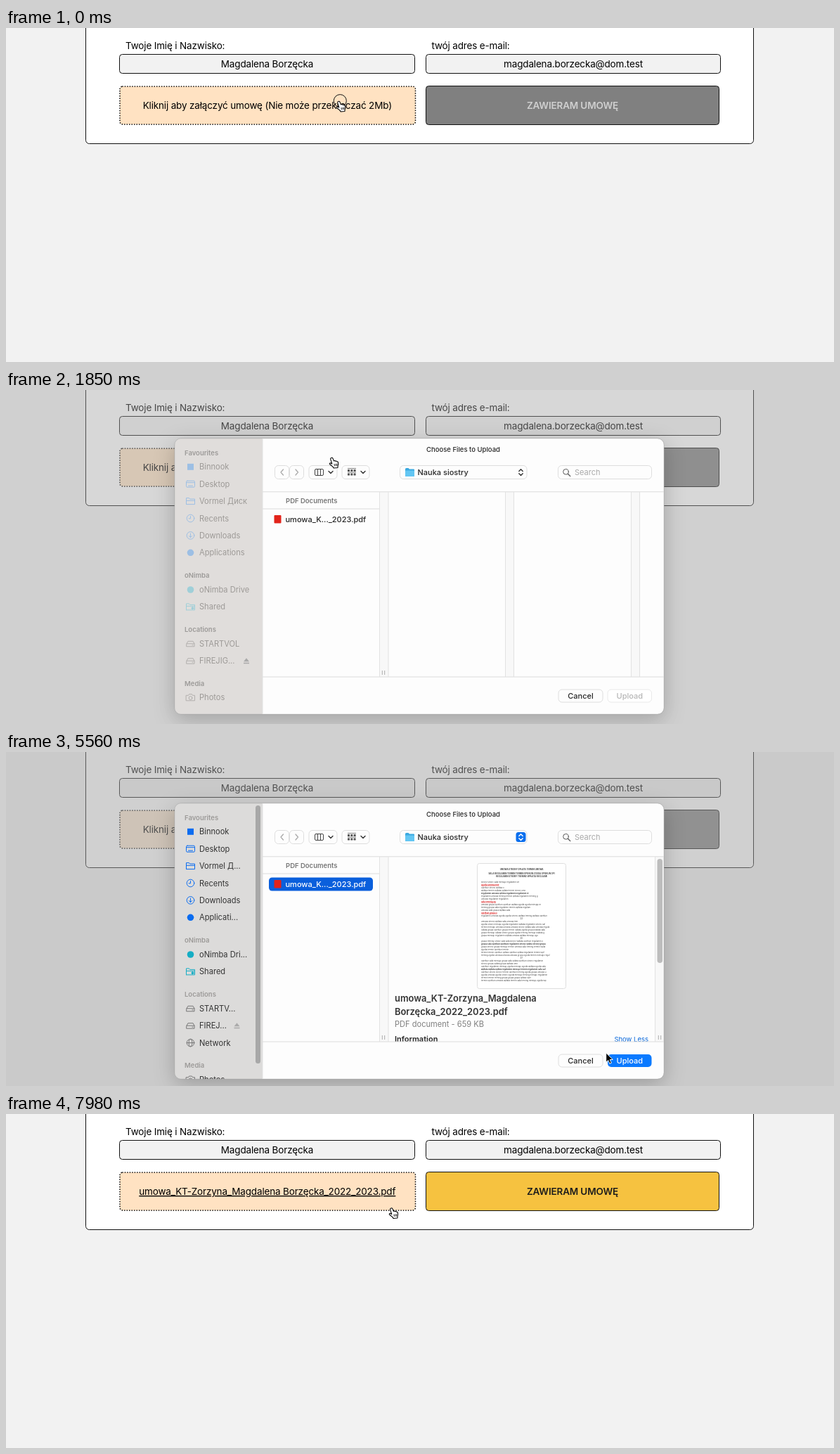
An HTML page for the animation above (8 s loop, 1178 px wide and 475 px high).

```html
<!DOCTYPE html>
<html lang="pl">
<head>
<meta charset="utf-8">
<title>Umowa</title>
<style>
  html, body { margin: 0; width: 100%; height: 100%; overflow: hidden; background: #f2f2f2; }
  svg { position: fixed; left: 0; top: 0; display: block; }
  text { font-family: Inter, "Open Sans", sans-serif; white-space: pre; }
  .page { font-size: 13.5px; letter-spacing: -.012em; }
  .ui { font-size: 11px; fill: #262626; }
  .small { font-size: 9.5px; }
  .icon { fill: none; stroke-width: 1; stroke-linejoin: round; stroke-linecap: round; }
  .shadow { filter: drop-shadow(0 8px 15px rgba(0,0,0,.22)); }
  .control { fill: none; stroke: #d6d6d6; stroke-width: .8; }
  .tiny { font-size: 2.9px; fill: #444; }
</style>
</head>
<body>
<svg id="stage" width="1178" height="475" viewBox="0 0 1178 475"></svg>
<script>
const LOOP = 8000;
const FILE = ["umowa_KT-Zorzyna_Magdalena", "Borzęcka_2022_2023.pdf"];

// Markup helpers
const rect = (x, y, w, h, r, attrs) =>
  `<rect x="${x}" y="${y}" width="${w}" height="${h}" rx="${r}" ${attrs}/>`;
const path = (d, attrs = "") => `<path d="${d}" ${attrs}/>`;
const text = (x, y, s, attrs = 'class="ui"') => `<text x="${x}" y="${y}" ${attrs}>${s}</text>`;
const group = (id, body, attrs = "") => `<g id="${id}" ${attrs}>${body}</g>`;
const vline = (x, y1, y2) => path(`M${x} ${y1}V${y2}`, 'stroke="#e2e2e2"');
const hline = (y, x1, x2) => path(`M${x1} ${y}H${x2}`, 'stroke="#dcdcdc"');
const MID = 'text-anchor="middle"';
const BOX = 'stroke="#111" stroke-width="1"';

function page() {
  const label = (x, y, s, more = "") => text(x, y, s, `class="page" ${more}`);
  const bold = 'text-anchor="middle" font-weight="600"';
  return rect(113.5, -8.5, 950, 173, 5, `fill="#fff" ${BOX}`)
    + label(170, 29.5, "Twoje Imię i Nazwisko:")
    + label(605.5, 29.5, "twój adres e-mail:")
    + rect(161.5, 37.5, 420, 27, 4, `fill="#f2f2f2" ${BOX}`)
    + rect(597.5, 37.5, 419, 27, 4, `fill="#f2f2f2" ${BOX}`)
    + label(371.5, 55.7, "Magdalena Borzęcka", MID)
    + label(807, 55.7, "magdalena.borzecka@dom.test", MID)
    + rect(162, 83, 420.5, 54, 4,
        'id="drop" stroke="#111" stroke-width="1.75" stroke-linecap="round" stroke-dasharray="0 3.48"')
    + group("prompt", label(371.8, 115, "Kliknij aby załączyć umowę (Nie może przekraczać 2Mb)", MID))
    + group("attached", label(371.8, 115, FILE.join(" "), MID + ' text-decoration="underline"'))
    + rect(597.5, 82.5, 417, 55, 4, `id="submit" ${BOX}`)
    + label(806, 115, "ZAWIERAM UMOWĘ", bold + ' id="submitText"');
}

// Sidebar icons, centred on 0,0
const ICONS = {
  square: rect(-4.5, -4.5, 9, 9, 0, 'fill="currentColor" stroke="none"'),
  dot: '<circle r="4.8" fill="currentColor" stroke="none"/>',
  desktop: rect(-6, -4.5, 12, 9, 1.5, "") + path("M-6 -2H6M-3 2.5H3"),
  folder: path("M-6 4V-4.5H-2L-.8 -3H6V4.5H-6ZM-6 -.8H6"),
  clock: '<circle r="5.3"/>' + path("M0 -3V.3H-2.4"),
  down: '<circle r="5.3"/>' + path("M0 -2.8V2.6M-2.2 .6L0 2.8L2.2 .6"),
  shared: path("M-6 4V-4.5H-2L-.8 -3H6V4.5H-6ZM-6 -1H6") + '<circle cx="3" cy="1.8" r="1.5" fill="currentColor"/>',
  drive: path("M-5.5 0L-3.6 -3.5H3.6L5.5 0V4H-5.5ZM-5.5 0H5.5M2.5 2H3.5"),
  globe: '<circle r="5.3"/><ellipse rx="2.4" ry="5.3"/>' + path("M-5.3 0H5.3"),
  camera: path("M-6 -3H-3L-2 -4.7H2L3 -3H6V4.5H-6Z") + '<circle cy=".7" r="2.4"/>'
};

// Rows: label, shortened label, icon, colour variable
const SECTIONS = [
  ["Favourites", 93, [
    ["Binnook", 0, "square", "blue"], ["Desktop", 0, "desktop", "blue"],
    ["Vormel Диск", "Vormel Д...", "folder", "blue"], ["Recents", 0, "clock", "blue"],
    ["Downloads", 0, "down", "blue"], ["Applications", "Applicati...", "dot", "blue"]]],
  ["oNimba", 267.7, [["oNimba Drive", "oNimba Dri...", "dot", "teal"], ["Shared", 0, "shared", "teal"]]],
  ["Locations", 344.5, [["STARTVOL", "STARTV...", "drive", "gray"], ["FIREJIG...", "FIREJ...", "drive", "gray"]]],
  ["Media", 421, [["Photos", 0, "camera", "gray"]]]
];

function sidebar(narrow) {
  let out = "";
  for (const [title, top, rows] of SECTIONS) {
    const list = narrow && title === "Locations" ? [...rows, ["Network", 0, "globe", "gray"]] : rows;
    const y0 = top + (narrow && title === "Media" ? 24.4 : 0);
    out += text(254, y0 + 3.5, title, 'class="small" font-weight="600" fill="#9c9a98"');
    list.forEach(([full, short, icon, tone], i) => {
      const y = y0 + 20.3 + i * 24.4;
      out += `<g class="icon" transform="translate(262.5 ${y})" style="color:var(--${tone});stroke:var(--${tone})">${ICONS[icon]}</g>`
        + text(275, y + 4, narrow && short || full, 'font-size="11.1" fill="var(--label)"');
      if (full.startsWith("FIRE")) {
        const x = narrow ? 328.5 : 342;
        out += path(`M${x - 4} ${y + 1}L${x} ${y - 4}L${x + 4} ${y + 1}ZM${x - 4} ${y + 2.6}h8v1.4h-8Z`, 'fill="#aaa"');
      }
    });
  }
  if (narrow) out += rect(355, 76, 7, 367, 3.5, 'fill="#a8a8a8"');
  return out;
}

function toolbar() {
  const chev = (x, y) => path(`M${x - 3} ${y - 1.5}l3 3l3 -3`, 'class="icon" stroke="#333" style="stroke-width:1.4"');
  const button = (x, w) => rect(x, 111.5, w, 19, 5, 'class="control"');
  let grid = "";
  for (const y of [117, 122.5]) for (const x of [486, 490.3, 494.6]) grid += rect(x, y, 3, 3, .5, 'fill="#555"');
  return text(650.5, 91.5, "Choose Files to Upload", 'class="ui small" font-weight="500" ' + MID)
    + button(382.5, 20) + button(403.5, 20) + button(431, 40) + button(478, 39)
    + path("M394.5 117l-3.5 4l3.5 4M412 117l3.5 4l-3.5 4", 'class="icon" stroke="#aaa" style="stroke-width:1.3"')
    + rect(439.5, 116.5, 12, 9, 1.5, 'class="icon" stroke="#444"')
    + path("M443.5 116.5v9M447.5 116.5v9", 'class="icon" stroke="#444"')
    + chev(462, 121) + grid + path("M486 115.5h12M486 121.2h12", 'stroke="#666" stroke-width=".8"') + chev(508, 121)
    + button(560.5, 180.5)
    + path("M568 116.5q0 -1.5 1.5 -1.5h3l1.5 1.5h6q1 0 1 1v8q0 1.5 -1.5 1.5h-10q-1.5 0 -1.5 -1.5Z", 'fill="#3aa9e0"')
    + rect(568, 118.5, 13, 8.5, 1, 'fill="#63c6f3"')
    + text(585.5, 125, "Nauka siostry", 'class="ui" font-weight="500"')
    + group("stepperOn", rect(725.5, 114, 14, 14, 3.5, 'fill="#0a6fee"'))
    + path("M729.8 119.5l2.7 -2.7l2.7 2.7M729.8 122.7l2.7 2.7l2.7 -2.7", 'id="stepper" class="icon" style="stroke-width:1.4"')
    + button(785.5, 133)
    + '<circle cx="796.5" cy="120.3" r="3.8" class="icon" stroke="#555"/>'
    + path("M799.4 123.2l3.4 3.4", 'class="icon" stroke="#555" style="stroke-width:1.3"')
    + text(809, 125, "Search", 'font-size="11" fill="#a9a9a9"');
}

function seeded(seed) {
  return () => (seed = (seed * 16807) % 2147483647) / 2147483647;
}

function documentPreview() {
  const words = "umowa strony opłata termin miesiąc grupa zgoda regulamin wpłata trening sala opiekun".split(" ");
  const rnd = seeded(77);
  const line = n => {
    let s = "";
    while (s.length < n) s += words[Math.floor(rnd() * words.length)] + " ";
    return s.slice(0, n);
  };
  let out = rect(670.5, 158.5, 126, 178, 3, 'fill="#fff" stroke="#dedede"');
  [[168, 32], [173.5, 54], [178.3, 40]].forEach(([y, n]) =>
    out += text(733.5, y, line(n).toUpperCase(), `class="tiny" font-weight="700" ${MID}`));
  for (let i = 0; i < 36; i++) {
    const y = 185.5 + i * 4;
    const red = i === 1 || i === 7 || i === 11;
    if (i === 13 || i === 20 || i === 27) {
      out += text(733.5, y, "§" + i % 10, `class="tiny" ${MID}`);
      continue;
    }
    const n = red ? 15 : i % 5 === 4 || i < 12 ? 22 + Math.floor(rnd() * 36) : 64;
    const look = red ? 'style="fill:#d22" text-decoration="underline"' : "";
    out += text(676, y, line(n), `class="tiny" font-weight="${red || i % 9 === 4 ? 700 : 400}" ${look}`);
  }
  return out;
}

function browser() {
  const grip = (x, y) => path(`M${x - 1.7} ${y - 3}v6M${x + 1.7} ${y - 3}v6`, 'stroke="#aaa"');
  const strip = (x, w) => rect(x, 149, w, 263, 0, 'fill="#000" fill-opacity=".02"')
    + vline(x, 149, 412) + vline(x + w, 149, 412);
  const empty = strip(710.5, 12) + strip(889.5, 12);
  const info = strip(923.5, 12.5) + rect(926.5, 152, 7.5, 148, 3.75, 'fill="#bdbdbd"') + grip(930, 406)
    + group("thumb", documentPreview())
    + FILE.map((s, i) => text(553, 355 + i * 19, s, 'font-size="12.9" font-weight="600" fill="#333"')).join("")
    + text(553, 391.3, "PDF document - 659 KB", 'font-size="11.1" fill="#808080"')
    + `<g clip-path="url(#cols)">${text(553, 412.3, "Information", 'class="ui" font-weight="600"')}</g>`
    + text(914, 412, "Show Less", 'class="small" fill="#0a68da" text-anchor="end"');
  return hline(148.8, 365, 936)
    + text(398, 164.8, "PDF Documents", 'class="small" font-weight="600" fill="#777"')
    + hline(173, 365, 531) + strip(531.5, 12.5) + grip(537, 406)
    + group("empty", empty) + group("info", info)
    + group("picked", rect(374, 178.5, 148, 19, 4.5, 'fill="#0a5fdc"'))
    + rect(381.5, 182, 10, 11.5, 1, 'fill="#e2231a"')
    + text(397.5, 192, "umowa_K..._2023.pdf", 'id="fileName" font-size="11" font-weight="500"')
    + hline(412, 365, 936)
    + rect(786, 430, 63, 18, 5, 'class="control"')
    + text(817.5, 443, "Cancel", 'class="ui" font-weight="500" ' + MID)
    + rect(856, 430, 62.5, 18, 5, 'id="upload" stroke-width=".8"')
    + text(887.3, 443, "Upload", `id="uploadText" font-size="11" font-weight="500" ${MID}`);
}

const ARROW = path("M0 0V13.2L3 10.4L5.2 15.3L7.6 14.2L5.5 9.5H9.6Z",
  'fill="#000" stroke="#fff" stroke-width="1" stroke-linejoin="round"');
const HAND = path("M3.2 1C4.5 .4 5.3 1.2 5.7 2.4L6.8 5.4C7.6 4.8 8.7 5 9 5.8C9.8 5.2 10.9 5.5 11.1 6.3"
  + "C12 6 12.8 6.6 12.9 7.5C13.3 9.5 13 11 12.5 12.5L12.4 15L6.5 15.5L6 14.2C4.5 13 3 11.5 1.2 10.2"
  + "C.2 9.3 1.2 8 2.5 8.5L4.2 9.4L2.2 3.2C1.9 2.2 2.3 1.3 3.2 1Z",
  'fill="#fff" stroke="#000" stroke-width="1.1" stroke-linejoin="round"')
  + path("M7.4 9.6l.4 3.2M9.3 9.4l.3 3.2M11 9.2l.2 3.2", 'stroke="#000" stroke-width=".8"');

const stage = document.getElementById("stage");
stage.innerHTML = `<defs>
    <clipPath id="frame">${rect(240, 73, 696, 392, 9, "")}</clipPath>
    <clipPath id="cols">${rect(365, 149, 571, 263, 0, "")}</clipPath>
  </defs>`
  + page()
  + rect(0, 0, 1178, 475, 0, 'id="dim" fill="#a2a2a2"')
  + group("dialog",
      group("panel", rect(240, 73, 696, 392, 9, 'class="shadow" fill="#fdfdfd"')
        + `<g clip-path="url(#frame)">${rect(240, 73, 125, 392, 0, 'id="sideFill"')}</g>`
        + rect(239.8, 72.8, 696.4, 392.4, 9.2, 'fill="none" stroke="#a5a5a5" stroke-width=".6"'))
      + group("content", vline(365, 73, 465) + group("wide", sidebar(false)) + group("narrow", sidebar(true))
        + toolbar() + browser(), 'clip-path="url(#frame)"'))
  + group("pointer", '<circle id="ring" cx="1.7" cy="-.4" r="9" fill="none" stroke="#111"/>'
      + group("arrow", ARROW) + group("hand", HAND, 'transform="translate(-4 -.5)"'));

const el = Object.fromEntries([...stage.querySelectorAll("[id]")].map(n => [n.id, n]));
const show = (id, on) => el[id].style.display = on ? "" : "none";
const set = (id, name, value) => el[id].setAttribute(name, value);

// time, dialog shift, panel opacity, content opacity, dimming
const DIALOG = [
  [0, 0, 0, 0, 0],
  [1730, -26, .3, .35, .12], [1790, -12, .85, .85, .3], [1850, -4, 1, 1, .43],
  [1910, -1.5, 1, 1, .48], [1960, -.5, 1, 1, .5], [2020, 0, 1, 1, .5],
  [6750, 0, 1, 1, .5], [6810, -1, .96, 1, .5], [6870, -7, .75, .85, .35],
  [6920, -15, .4, .6, .19], [6980, -26, .08, .22, .06], [7040, -30, .03, .1, .02],
  [7100, 0, 0, 0, 0]
];
// time and pointer tip
const TRACK = [
  [0, 473.6, 104], [60, 473.6, 104], [350, 463.6, 96], [2450, 463.6, 96],
  [2750, 468, 119], [3000, 451, 164], [3250, 435.5, 187], [3310, 435.5, 186.3], [4700, 435.5, 186.3],
  [4880, 470, 206], [5130, 640, 301], [5380, 812, 403], [5510, 851, 426],
  [5800, 866.4, 437.3], [7510, 866.4, 437.3], [7690, 812, 382], [7860, 614, 198], [7980, 548.5, 133.5]
];
const CLICKS = [[0, 60], [1010, 1190], [3910, 4090], [6570, 6750]];

const between = (t, a, b) => t >= a && t < b;
const poseAt = t => DIALOG.filter(r => r[0] <= t).pop();

function tipAt(t) {
  const i = TRACK.findIndex(k => k[0] > t);
  if (i < 0) return TRACK[TRACK.length - 1].slice(1);
  const [t0, x0, y0] = TRACK[i - 1], [t1, x1, y1] = TRACK[i];
  const p = (t - t0) / (t1 - t0);
  return [x0 + (x1 - x0) * p, y0 + (y1 - y0) * p];
}

function render(t) {
  const [, shift, panel, content, dim] = poseAt(t);
  const active = t >= 1910, picked = t >= 4090, closing = t >= 6750, done = t >= 7100;

  show("dialog", content > 0);
  set("dialog", "transform", `translate(0 ${shift})`);
  set("panel", "opacity", panel);
  set("content", "opacity", content);
  set("dim", "opacity", dim);

  show("wide", !active);
  show("narrow", active);
  show("stepperOn", active);
  set("stepper", "stroke", active ? "#fff" : "#333");
  set("sideFill", "fill", active ? "#dcdbda" : "#e0dddb");
  const tones = !active ? ["#9dbfe4", "#9fcfd8", "#b3b0ae", "#9d9a97"]
    : closing ? ["#222", "#222", "#333", "#333"] : ["#0a6cf0", "#15adc4", "#777", "#333"];
  ["blue", "teal", "gray", "label"].forEach((n, i) => el.content.style.setProperty("--" + n, tones[i]));

  show("empty", !picked);
  show("info", picked);
  show("picked", picked);
  show("thumb", between(t, 4150, 6750));
  set("fileName", "fill", picked ? "#fff" : "#262626");
  set("upload", "fill", !picked ? "#fff" : t >= 6570 ? "#0c6ce6" : "#0a7aff");
  set("upload", "stroke", picked ? "none" : "#e4e4e4");
  set("uploadText", "fill", picked ? "#fff" : "#b5b5b5");

  set("drop", "fill", between(t, 2560, 6750) ? "#fbe6cd" : "#ffe2c2");
  show("prompt", !done);
  show("attached", done);
  set("submit", "fill", done ? "#f6c240" : "#808080");
  set("submitText", "fill", done ? "#1c1c1c" : "#d0d0d0");

  const [x, y] = tipAt(t);
  const hand = t < 2500 || (t > 7500 && y < 138);
  set("pointer", "transform", `translate(${x.toFixed(2)} ${y.toFixed(2)})`);
  show("hand", hand);
  show("arrow", !hand);
  show("ring", CLICKS.some(([a, b]) => between(t, a, b)));
}

const start = performance.now();
function tick() {
  render((performance.now() - start) % LOOP);
  requestAnimationFrame(tick);
}
tick();
</script>
</body>
</html>
```
